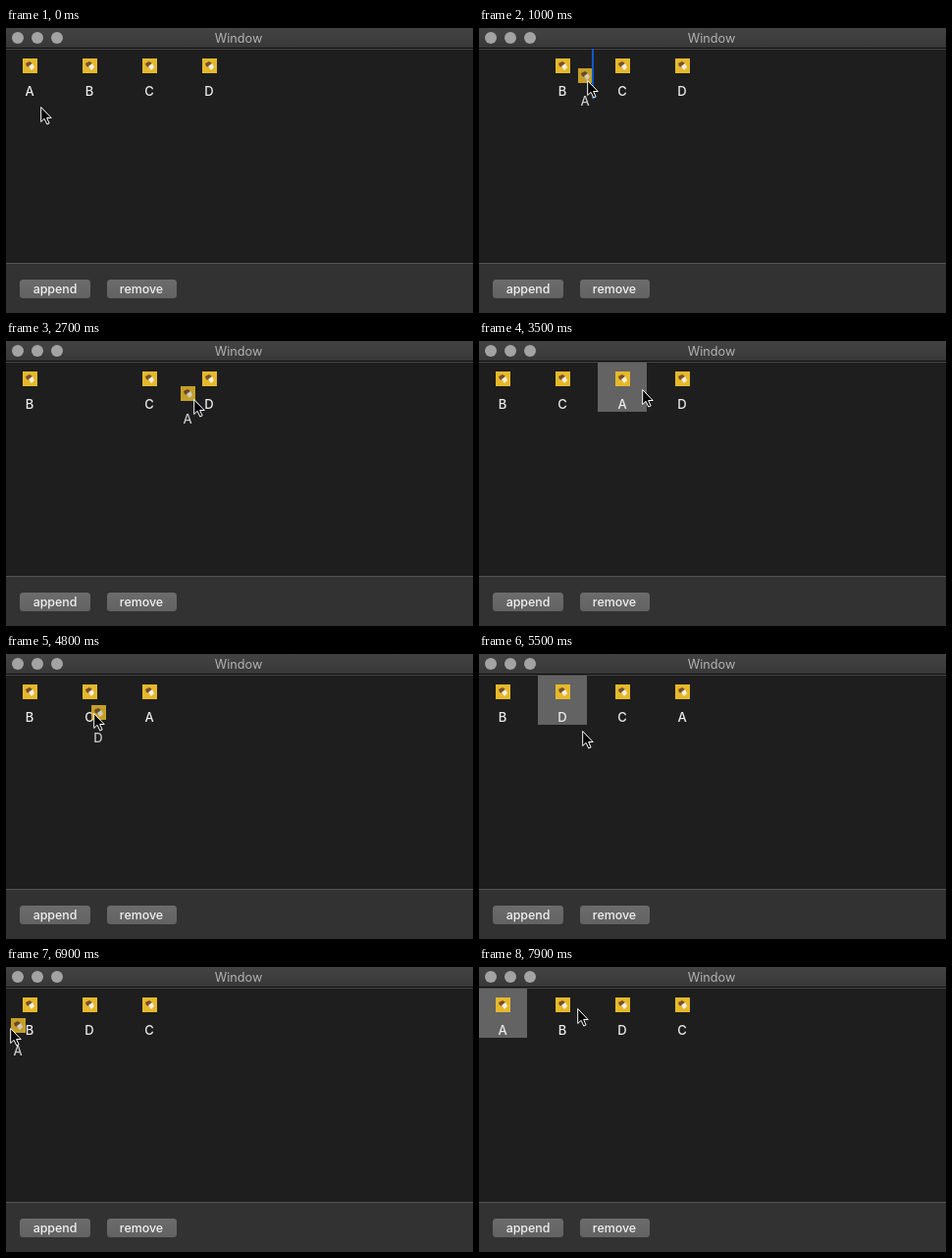
An HTML page that plays this animation: 476x290 px, repeating every 8 s.

```html
<!DOCTYPE html>
<html lang="en">
<head>
<meta charset="utf-8">
<title>Window</title>
<style>
  html, body { margin: 0; width: 100%; height: 100%; overflow: hidden; background: #1e1e1e; }
  svg { display: block; width: 476px; height: 290px; }
  text { font: 500 13px Inter, "Liberation Sans", sans-serif; text-anchor: middle; fill: #ececec; }
  .title { font-size: 12.7px; font-weight: 400; fill: #b2b2b2; }
  .button { font-size: 12.4px; fill: #f0f0f0; }
</style>
</head>
<body>
<svg viewBox="0 0 476 290">
  <defs>
    <linearGradient id="bar" x2="0" y2="1">
      <stop stop-color="#434343"/><stop offset="1" stop-color="#383838"/>
    </linearGradient>
    <linearGradient id="face" x2="0" y2="1">
      <stop stop-color="#6c6c6c"/><stop offset="1" stop-color="#626262"/>
    </linearGradient>
    <g id="picture">
      <rect width="15" height="15" fill="#e5b92b"/>
      <path d="M3 5 7 3 10 5 7 9 4 8Z" fill="#79502a"/>
      <path d="M6 8 10 5 12 9 9 12Z" fill="#f4eee0"/>
    </g>
  </defs>

  <rect width="476" height="290" fill="#1e1e1e"/>
  <rect width="476" height="20" fill="url(#bar)"/>
  <rect y="20" width="476" height="1" fill="#0c0c0c"/>
  <rect y="21" width="476" height="1" fill="#474747"/>
  <g fill="#a3a3a3">
    <circle cx="12" cy="10" r="6"/><circle cx="32" cy="10" r="6"/><circle cx="52" cy="10" r="6"/>
  </g>
  <text class="title" x="237" y="15">Window</text>

  <rect y="239" width="476" height="51" fill="#323232"/>
  <rect y="239" width="476" height="1" fill="#545454"/>
  <rect x="14" y="256" width="72" height="19" rx="3.5" fill="url(#face)"/>
  <rect x="103" y="256" width="71" height="19" rx="3.5" fill="url(#face)"/>
  <text class="button" x="50" y="270">append</text>
  <text class="button" x="138" y="270">remove</text>

  <rect id="select" y="22" width="50" height="50" fill="#636363"/>
  <g id="items"></g>
  <rect id="marker" y="21" width="2" height="51" fill="#0f58c8"/>
  <path id="cursor" d="M-.3 .5V15.5L3.1 12.3 5.8 18 8.1 17 5.6 11.5H10.2Z"
        fill="#000" stroke="#fff" stroke-linejoin="round"/>
</svg>
<script>
const LOOP = 8000, STEP = 100, LAG = 35;
const PITCH = 61, CELL = 50, HOME = [17, 31], START = [36, 80];
let order = [..."ABCD"];

// The pointer reaches for an item, grips it at an offset, makes some moves
// (start, end, x, y) and lets go on the way, which puts the item in slot `to`.
const gestures = [
  { name: "A", to: 1, reach: [0, 400], grip: [10, 12], drop: 1300,
    moves: [[500, 960, 111, 53]] },
  { name: "A", to: 2, reach: [1600, 1900], grip: [14, 13], drop: 3200,
    moves: [[1900, 2680, 192, 59], [2800, 3500, 167, 49]] },
  { name: "D", to: 1, reach: [3500, 4300], grip: [15, 6], drop: 5200,
    moves: [[4350, 5000, 54, 67], [5100, 5500, 106, 78]] },
  { name: "A", to: 0, reach: [5500, 5900], grip: [0, 10], drop: 7300,
    moves: [[6300, 6400, 93, 66], [6400, 6860, 5, 62], [7100, 7600, 77, 46], [7800, 7900, 101, 42]] }
];

const $ = id => document.getElementById(id);
const place = (el, x, y) => el.setAttribute("transform", `translate(${x} ${y})`);
const show = (el, on) => el.setAttribute("visibility", on ? "visible" : "hidden");
const ease = k => k * k * (3 - 2 * k);
const mix = (a, b, k) => a + (b - a) * k;
const slotX = slot => HOME[0] + slot * PITCH;

const items = {};
for (const name of order) {
  $("items").insertAdjacentHTML("beforeend",
    `<g><use href="#picture"/><text x="7" y="38">${name}</text></g>`);
  items[name] = $("items").lastChild;
}

// Derive where each grip happens and the order before and after each drop
const legs = [];
for (const g of gestures) {
  const [dx, dy] = g.grip;
  legs.push([...g.reach, slotX(order.indexOf(g.name)) + dx, HOME[1] + dy], ...g.moves);
  g.start = g.moves[0][0];
  g.before = order;
  order = order.filter(name => name !== g.name);
  order.splice(g.to, 0, g.name);
  g.after = order;
}

function pointer(t) {
  let [x, y] = START;
  for (const [start, end, toX, toY] of legs) {
    if (t <= start) break;
    const k = ease(Math.min(1, (t - start) / (end - start)));
    x = mix(x, toX, k);
    y = mix(y, toY, k);
  }
  return [Math.round(x), Math.round(y)];
}

function draw(time) {
  const t = Math.floor(time / STEP) * STEP;
  const [x, y] = pointer(t);
  const drag = gestures.find(g => t > g.start && t < g.drop);
  const last = gestures.filter(g => t >= g.drop).at(-1);
  const now = last ? last.after : gestures[0].before;
  const sliding = last && t < last.drop + STEP;

  for (const name in items) {
    const el = items[name], held = drag && drag.name === name;
    el.setAttribute("opacity", held ? 0.84 : 1);
    if (held) {
      const [px, py] = pointer(t - LAG);
      place(el, px - drag.grip[0], py - drag.grip[1]);
      if (el.nextSibling) el.parentNode.append(el);
    } else {
      let slot = now.indexOf(name);
      if (sliding && name !== last.name) slot = mix(last.before.indexOf(name), slot, 0.5);
      place(el, slotX(slot), HOME[1]);
    }
  }

  show($("select"), last && !drag);
  if (last) $("select").setAttribute("x", last.to * PITCH - 1);

  // The insertion bar appears while the pointer is between two cells
  show($("marker"), drag && (x + 1) % PITCH >= CELL);
  $("marker").setAttribute("x", Math.floor((x + 1) / PITCH) * PITCH + CELL + 4);

  place($("cursor"), x, y);
}

const begin = performance.now();
function tick() {
  draw((performance.now() - begin) % LOOP);
  requestAnimationFrame(tick);
}
tick();
</script>
</body>
</html>
```
